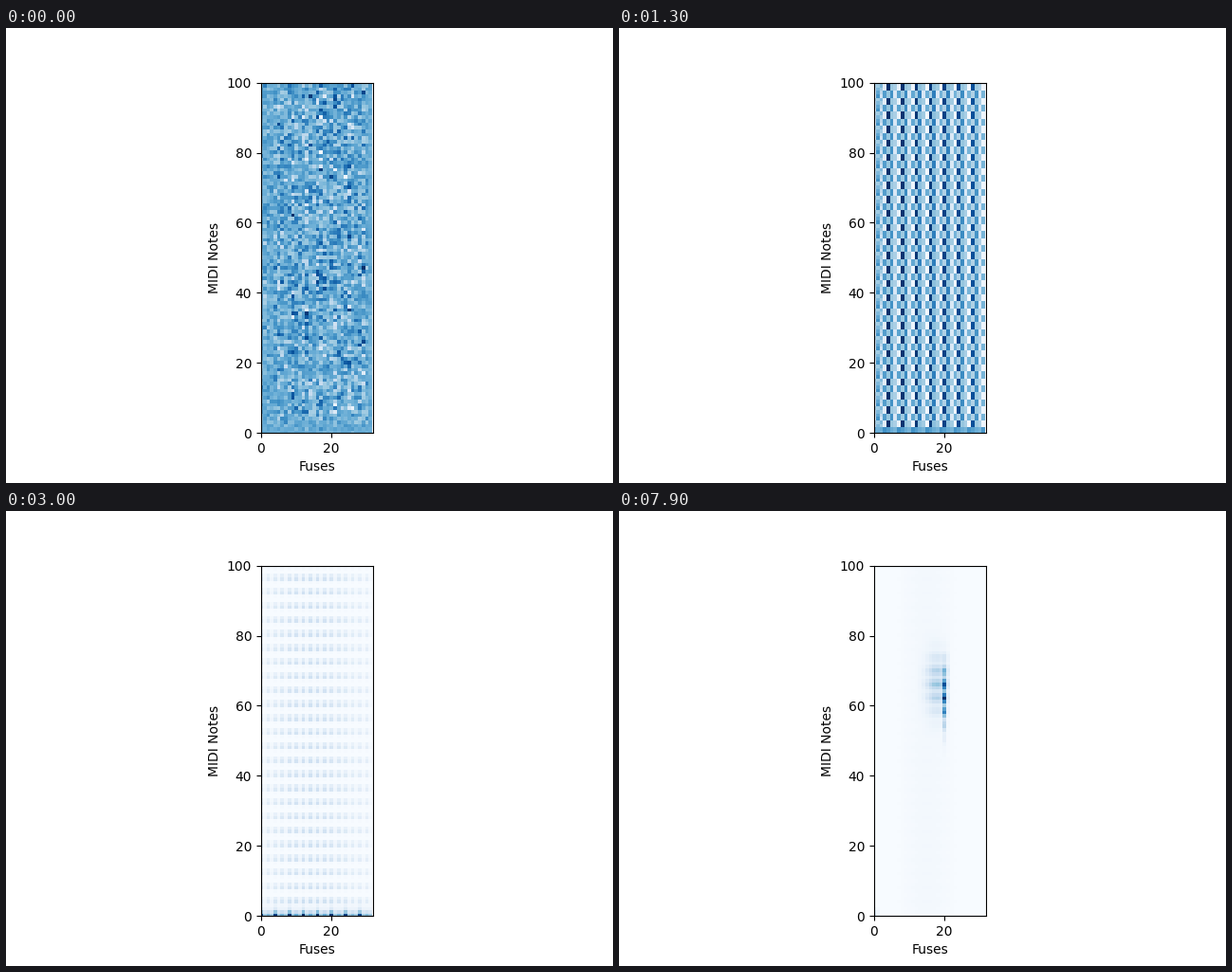
These frames come from a looping animation (640x480 px, 8000 ms). A matplotlib script:

```python
import numpy as np
import matplotlib.pyplot as plt
from matplotlib.animation import FuncAnimation

ROWS, COLS = 101, 32
FRAMES, STEP = 80, 100

r, c = np.mgrid[0:ROWS, 0:COLS]
rng = np.random.default_rng(7)
even = (r % 2 == 0) & (c % 2 == 0)
check = (r + c) % 2
base = np.exp(-r / 1.1)  # strongest in the lowest row


def wave(x, peak):
    """Cosine between 0 and 1 that repeats every four cells."""
    return 0.5 + 0.5 * np.cos(np.pi / 2 * (x - peak))


def bump(x, mid, width):
    return np.exp(-((x - mid) / width) ** 2)


def mix(a, b, share):
    return a + (b - a) * share


def noise():
    amp = 0.09 + 0.07 * wave(c, 1)
    amp *= np.clip(0.45 + c / 14, 0, 1) * np.clip(0.2 + r / 6, 0, 1)
    amp *= np.clip(0.4 + (COLS - 1 - c) / 4, 0, 1)
    return np.clip(0.46 + amp * rng.standard_normal(r.shape), 0, 1)


def stripes():
    blocks = (r // 2 + c) % 2
    f = 0.12 + 0.55 * wave(c, 1.15) + 0.2 * blocks
    f = mix(0.45, f, 0.75 + 0.25 * bump(c, 18, 11))
    return mix(f, 0.5, r < 2)


def stairs():
    steps = wave(r + 2 * c, 2.5)
    f = 0.06 + 0.9 * wave(c, 3.7) ** 1.5 * (0.3 + 0.7 * steps)
    f *= 1 - 0.006 * c
    f = mix(f, 0.1 + 0.08 * check, c < 3)
    return mix(f, 0.42, 0.7 * (r < 2))


def dots():
    f = 0.07 + 0.27 * even + 0.15 * (c % 2) * (r % 2)
    f += 0.08 * (c % 2) * bump(c, 16, 9)
    f = np.maximum(f, (wave(c, 0) * wave(r, 2)) ** 4)
    edge = (c < 2) | (c > 28)
    return mix(f, 0.13 + 0.14 * check, edge)


def faint():
    f = 0.04 + (0.06 + 0.17 * (c % 2 == 0)) * wave(r, 0.3) ** 2 \
        * (0.5 + 0.65 * bump(c, 14, 10))
    return f + base * (0.4 + 0.55 * wave(c, 0) * (c % 2 == 0))


def settled():
    f = 0.015 + 0.03 * (c == 3) * (1 + r % 2) + 0.01 * wave(c, 3)
    f += base * (0.1 + 0.25 * wave(c, 0) * np.exp(-c / 8))
    f += 0.2 * (r == 1) * bump(c, 31, 1)
    return f + bump(c, 0, 1) * bump(r, 0, 1.5)


def cluster():
    f = 0.015 + 0.025 * bump(c, 15, 6) * (0.7 + 0.3 * wave(r, 0))
    f += 0.2 * bump(c, 0, 1) * bump(r, 0, 1.5)
    ripple = 0.4 + 0.6 * wave(r, 2)
    core = (c == 20) * bump(r, 63, 8)
    halo = 0.38 * bump(c, 17.8, 3) * (c < 20) + 0.15 * (c == 21)
    return f + ripple * (core + halo * bump(r, 66, 8))


def tail(share):
    """Quiet body while the lowest rows still fade."""
    return mix(settled(), faint(), share * (r < 5))


keys = [(0, noise()), (800, stripes()), (1800, stairs()), (2400, dots()),
        (3000, faint()), (3600, tail(0.4)), (4200, tail(0.06)),
        (5200, settled()), (7200, settled()), (7900, cluster())]


def field(t):
    for (t0, a), (t1, b) in zip(keys, keys[1:]):
        if t <= t1:
            return mix(a, b, (t - t0) / (t1 - t0))
    return keys[-1][1]


fig, ax = plt.subplots(figsize=(6.4, 4.8), dpi=100)
im = ax.imshow(keys[0][1], cmap="Blues", origin="lower",
               interpolation="nearest")
ax.set(xlim=(0, 32), ylim=(0, 100), xlabel="Fuses", ylabel="MIDI Notes")


def update(i):
    f = field(i * STEP)
    im.set_data(f)
    im.set_clim(f.min(), f.max())
    return [im]


anim = FuncAnimation(fig, update, frames=FRAMES, interval=STEP,
                     repeat=True, repeat_delay=0)
plt.show()
```
